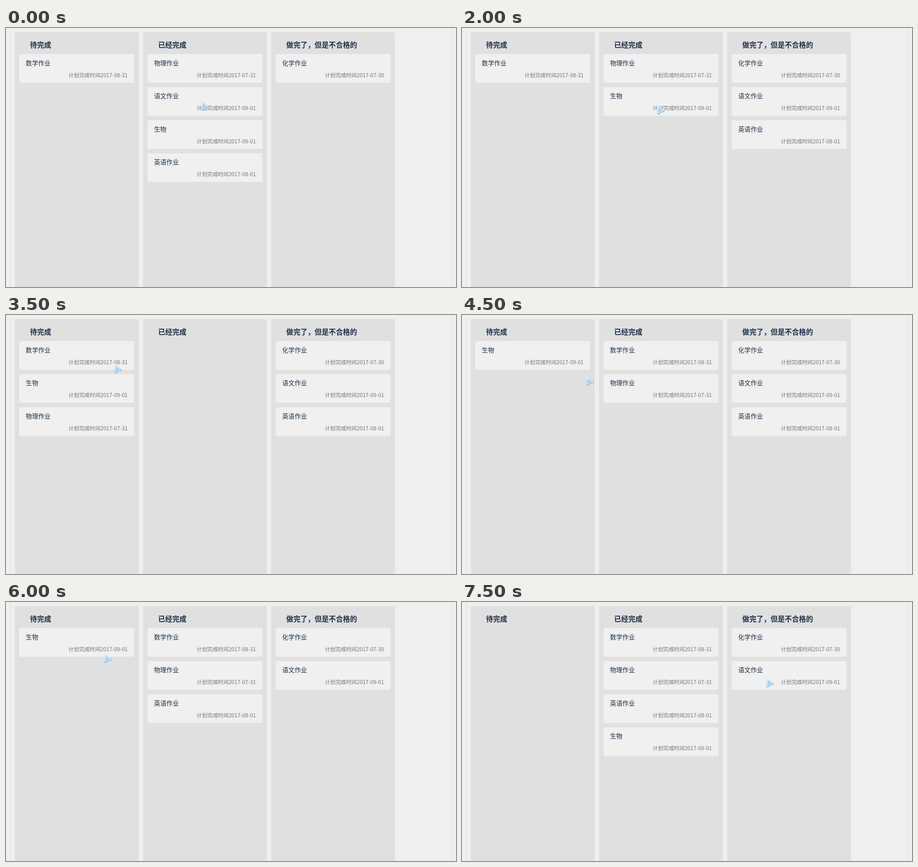
Write an HTML page with a canvas that moves like this. It is 985x568 px and loops after 8 s.

```html
<!DOCTYPE html>
<html lang="zh-CN">
<head>
<meta charset="utf-8">
<title>作业看板</title>
<style>
  html, body { margin: 0; width: 100%; height: 100%; overflow: hidden; background: #efefef; }
  canvas { display: block; }
</style>
</head>
<body>
<canvas id="board" width="985" height="568"></canvas>
<script>
const ctx = document.getElementById('board').getContext('2d');
const FONT = '"Noto Sans CJK SC", "Noto Sans CJK", sans-serif';
const STEP = 500;
const GRIP = { x: 230, y: 31 }; // where a dragged card is held

const cards = {
  m: ['数学作业', '2017-08-31'],
  p: ['物理作业', '2017-07-31'],
  y: ['语文作业', '2017-09-01'],
  b: ['生物', '2017-09-01'],
  e: ['英语作业', '2017-08-01'],
  h: ['化学作业', '2017-07-30']
};

const columns = [
  { x: 19.4, title: '待完成' },
  { x: 300, title: '已经完成' },
  { x: 580.6, title: '做完了，但是不合格的' }
];

// Card order per column, from the given step on
const layouts = [
  [0, 'm|pybe|h'],
  [2, 'm|pbe|hy'],
  [4, 'm|pb|hye'],
  [5, 'mb|p|hye'],
  [7, 'mbp||hye'],
  [8, 'bp|m|hye'],
  [9, 'b|mp|hye'],
  [12, 'b|mpe|hy'],
  [15, '|mpeb|hy']
];

// Pointer tip per step, with the card being dragged
const pointer = [
  [427, 159], [423, 161], [480, 204], [774, 225, 'e'],
  [427, 168], [427, 110], [378, 267, 'p'], [237, 106],
  [215, 162], [272, 133], [573, 252], [711, 227],
  [215, 112], [312, 111, 'b'], [543, 300, 'b'], [666, 165]
];

const rim = new Path2D('M0.5 0.5 L2 0.5 L16 13.5 L15.5 16 L9 17.5 L4 21.5 L0.5 21.5 Z');
const edge = new Path2D('M1.8 2.2 L14 13.8 L7.8 15.2 L2.2 19.2 Z');

function text(str, x, y, font, color, align = 'left') {
  ctx.font = `${font} ${FONT}`;
  ctx.fillStyle = color;
  ctx.textAlign = align;
  ctx.fillText(str, x, y);
}

function drawCard(id, x, y) {
  const [title, date] = cards[id];
  ctx.fillStyle = '#f0f0f0';
  ctx.beginPath();
  ctx.roundRect(x, y, 251.5, 63, 4);
  ctx.fill();
  text(title, x + 14.3, y + 24.6, '13.6px', '#1b3048');
  text('计划完成时间' + date, x + 237.3, y + 50.5, '11.65px', '#757575', 'right');
}

function drawBoard(layout) {
  ctx.fillStyle = '#efefef';
  ctx.fillRect(0, 0, 985, 568);
  ctx.fillStyle = '#dfdfdf';
  ctx.fillRect(9, 0, 1, 568);
  ctx.fillRect(975, 0, 1, 568);
  layout.split('|').forEach((ids, i) => {
    const { x, title } = columns[i];
    ctx.fillStyle = '#e0e0e0';
    ctx.fillRect(x, 9, 271, 559);
    text(title, x + 33, 43, 'bold 15.5px', '#1f3048');
    [...ids].forEach((id, row) => drawCard(id, x + 9.6, 57 + row * 72.6));
  });
}

function drawPointer(x, y) {
  ctx.save();
  ctx.translate(x, y);
  const shade = ctx.createLinearGradient(2, 2, 10, 20);
  shade.addColorStop(0, '#c9dfef');
  shade.addColorStop(0.5, '#a3cdee');
  shade.addColorStop(1, '#69b0e6');
  ctx.fillStyle = shade;
  ctx.fill(rim);

  const glass = ctx.createLinearGradient(2, 4, 8, 18);
  glass.addColorStop(0, '#c4e0f6');
  glass.addColorStop(1, '#8fc6f2');
  ctx.fillStyle = glass;
  ctx.fill(edge);
  ctx.lineJoin = 'round';
  ctx.lineWidth = 1.3;
  ctx.strokeStyle = '#f2f8fd';
  ctx.stroke(edge);
  ctx.restore();
}

function frame(now) {
  const step = Math.floor(now / STEP) % pointer.length;
  const layout = layouts.filter(([from]) => from <= step).pop()[1];
  const [x, y, dragged] = pointer[step];
  drawBoard(layout);
  if (dragged) {
    ctx.globalAlpha = 0.6;
    drawCard(dragged, x - GRIP.x, y - GRIP.y);
    ctx.globalAlpha = 1;
  }
  drawPointer(x, y);
}

let start;
function tick(now) {
  start ??= now;
  frame(now - start);
  requestAnimationFrame(tick);
}
frame(0);
requestAnimationFrame(tick);
</script>
</body>
</html>
```
